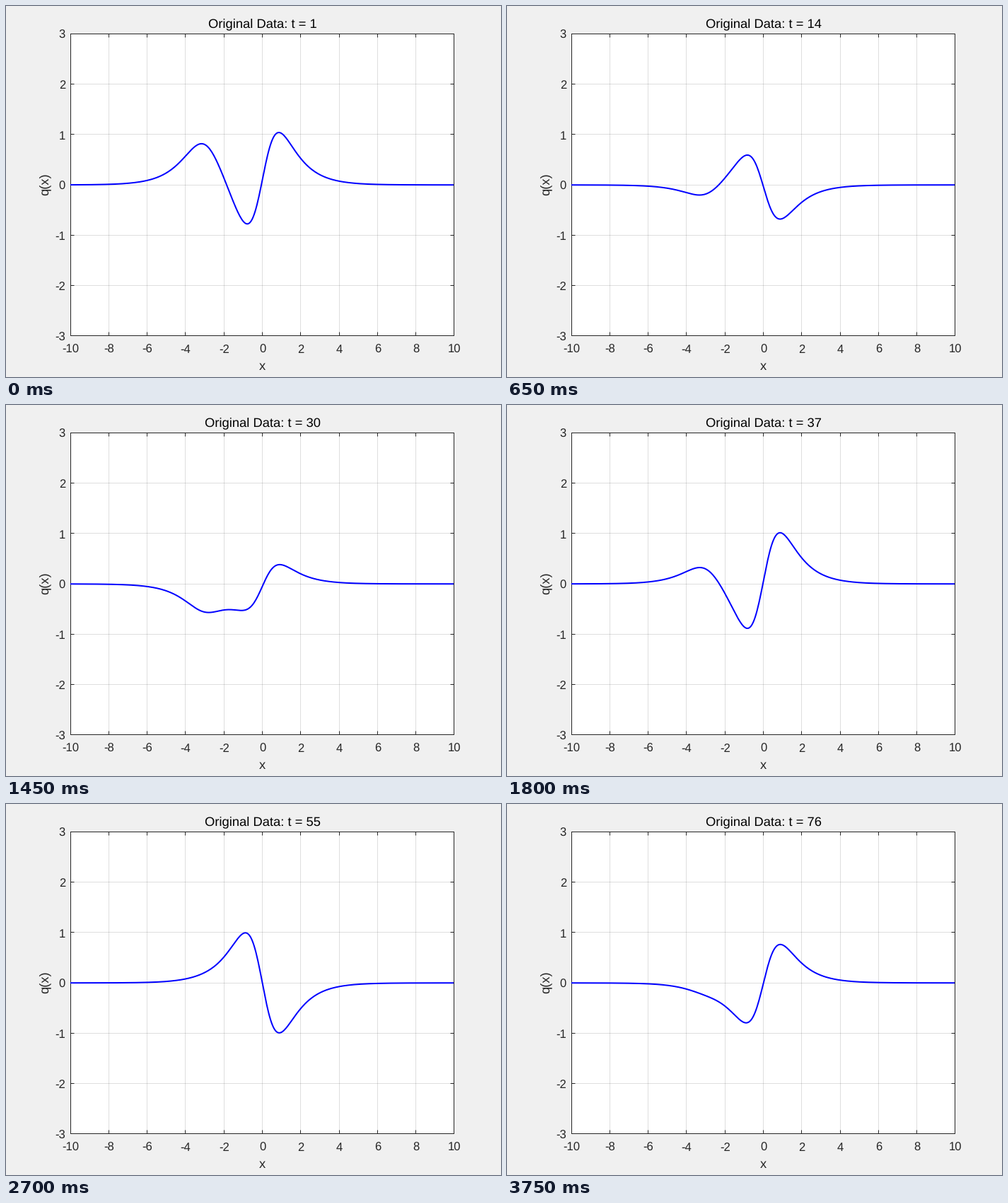
Animation, 700 px wide and 525 px high, one loop 3800 ms. Source, as a matplotlib script:

```python
import numpy as np
import matplotlib.pyplot as plt
from matplotlib.animation import FuncAnimation
from matplotlib.transforms import Affine2D

W, H, DPI = 700, 525, 100
PX = 72 / DPI  # one pixel in points
LEFT, RIGHT, TOP, BOTTOM = 90.6, 633.4, 39, 466.4
INK = "#262626"
FRAMES, INTERVAL = 76, 50

plt.rcParams.update({
    "font.family": "Liberation Sans",
    "text.hinting": "none",
    "axes.unicode_minus": False,
})

x = np.linspace(-10, 10, 400)
times = np.linspace(0, 4 * np.pi, 200)
bump = 1 / np.cosh(x + 3)
wave = 2 * np.tanh(x) / np.cosh(x)


def signal(t):
    """Real part of two spatial modes oscillating at different rates."""
    return bump * np.cos(2.3 * t) + wave * np.cos(2.8 * t)


fig = plt.figure(figsize=(W / DPI, H / DPI), dpi=DPI, facecolor="#f0f0f0")
ax = fig.add_axes([LEFT / W, 1 - BOTTOM / H,
                   (RIGHT - LEFT) / W, (BOTTOM - TOP) / H])
ax.set(xlim=(-10, 10), ylim=(-3, 3),
       xticks=range(-10, 11, 2), yticks=range(-3, 4))
ax.grid(color=INK, alpha=0.15, linewidth=PX)
ax.tick_params(direction="in", length=5 * PX, width=PX, color=INK,
               top=True, right=True, labelbottom=False, labelleft=False)
for spine in ax.spines.values():
    spine.set(linewidth=PX, color=INK)


def label(px, py, text, size=16.67, color=INK, **kw):
    """Place text with its baseline at a pixel position from the top left."""
    kw = {"ha": "center", "va": "baseline", **kw}
    return fig.text(px / W, 1 - py / H, text, fontsize=size * PX,
                    color=color, **kw)


for v in range(-10, 11, 2):
    label(LEFT + 0.5 + (v + 10) * (RIGHT - LEFT) / 20, 491, str(v))
for v in range(-3, 4):
    label(84, TOP + 7.2 + (3 - v) * (BOTTOM - TOP) / 6, str(v), ha="right")
label(362.5, 515, "x", 18.33)
label(59, 252.5, "q(x)", 18.33, rotation=90, rotation_mode="anchor")

title = label(362.5, 30, "", 18.33, "black")

# Half a pixel puts the curve on the centres of the snapped grid lines.
half_pixel = Affine2D().translate(0.5, -0.5)
curve, = ax.plot(x, signal(0), color="#0000ff", linewidth=2 * PX, zorder=3,
                 transform=ax.transData + half_pixel)


def update(i):
    curve.set_ydata(signal(times[i]))
    title.set_text(f"Original Data: t = {i + 1}")
    return curve, title


anim = FuncAnimation(fig, update, frames=FRAMES, interval=INTERVAL, repeat=True)
plt.show()
```
